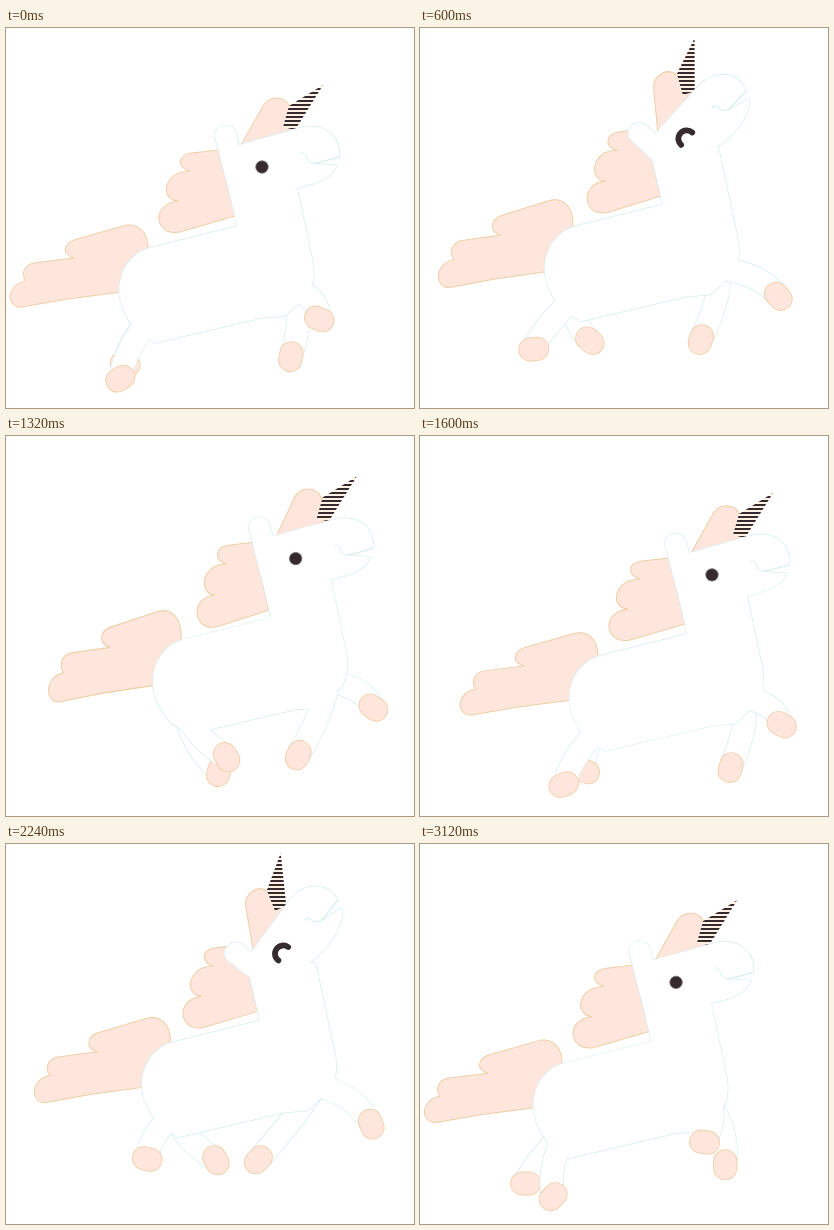
An HTML page with a canvas that plays this animation: 408 px wide and 380 px high, repeating every 3160 ms.

```html
<!DOCTYPE html>
<html>
<head>
<meta charset="utf-8">
<title>Galloping unicorn</title>
<style>
html, body { margin: 0; width: 100%; height: 100%; overflow: hidden; background: #fff; }
canvas { display: block; }
</style>
</head>
<body>
<canvas id="stage" width="408" height="380"></canvas>
<script>
const ctx = document.getElementById('stage').getContext('2d');
const { sin, cos, floor, PI } = Math;
const LOOP = 3160, HOP = LOOP / 2, STEP = 40, TURN = 2 * PI, RAD = PI / 180;
const PEACH = '#ffe6dc', GOLD = '#edcfa6', ICE = '#d6ecef', DARK = '#352b2f';

// All shapes share the coordinates of the resting pose.
const body = new Path2D('M231 198L143 220C118 228 108 255 116 278Q121 292 131 303L149 315L255 290L279 288L301 268Q310 255 307 235L287 141L250 138L221 154L229 188Z');
const head = new Path2D('M211 116L209 109C208 95 227 94 230 105L233 117L297 99C322 95 336 112 333 129L306 136L331 137Q326 153 291 160L240 165L221 155Z');
const mouth = new Path2D('M295 126C296 122 300 126 301 131Q304 136 310 135L333 129');
const tuft = new Path2D('M235 117L257 78C264 66 281 68 284 80L290 102Z');
const horn = new Path2D('M317 57L283 78L277 99L289 102Z');
const mane = new Path2D('M213 122L186 125C172 126 170 140 184 143C163 143 156 161 163 169Q166 173 172 173C157 175 152 184 153 192C155 203 165 206 174 204L229 188Z');
const tail = new Path2D('M142 222C143 202 130 194 117 198L68 212C57 216 56 227 68 230L28 235C17 237 15 247 20 253C7 255 2 266 5 273Q8 280 16 279L62 271L116 264Z');

function ramp(t, from, to) {
  const k = Math.min(1, Math.max(0, (t - from) / (to - from)));
  return k * k * (3 - 2 * k);
}

// Hooves circle a slanted ellipse three times per hop.
const rear = { hip: [145, 290], knee: [-12, 3], center: [150, 344], rx: 48, ry: 10, slant: 0, tilt: 80 };
const fore = { hip: [288, 262], knee: [12, -9], center: [287, 313], rx: 62, ry: 15, slant: 20, tilt: 55 };
const nearLegs = [{ ...rear, phase: 138, swing: 0 }, { ...fore, phase: -65, swing: 0 }];
const farLegs = [{ ...rear, phase: 230, swing: 0 }, { ...fore, phase: 92, swing: -52 }];

function poseLeg({ hip, knee, center, rx, ry, slant, tilt, phase, swing }, hop) {
  const angle = (phase + 1080 * hop + swing * sin(TURN * hop)) * RAD;
  const x = center[0] + rx * cos(angle);
  const y = center[1] + ry * sin(angle) - slant * cos(angle);
  const limb = new Path2D(), hoof = new Path2D();
  limb.moveTo(...hip);
  limb.quadraticCurveTo((hip[0] + x) / 2 + knee[0], (hip[1] + y) / 2 + knee[1], x, y);
  const lean = tilt * RAD + angle / 2, dx = 3.5 * cos(lean), dy = 3.5 * sin(lean);
  hoof.moveTo(x - dx, y - dy);
  hoof.lineTo(x + dx, y + dy);
  return { limb, hoof };
}

function line(path, color, width) {
  ctx.strokeStyle = color;
  ctx.lineWidth = width;
  ctx.stroke(path);
}

function fill(path, color) {
  ctx.fillStyle = color;
  ctx.fill(path);
}

function hair(path) {
  fill(path, PEACH);
  line(path, GOLD, 1);
}

function drawHoof({ hoof }) {
  line(hoof, GOLD, 24);
  line(hoof, PEACH, 22.4);
}

// Draws around a fixed point with a rotation and a stretch.
function around(x, y, { turn = 0, sx = 1, sy = 1 }, paint) {
  ctx.save();
  ctx.translate(x, y);
  ctx.rotate(turn * RAD);
  ctx.scale(sx, sy);
  ctx.translate(-x, -y);
  paint();
  ctx.restore();
}

// The stripes stay level however the horn is turned.
function drawHorn() {
  ctx.save();
  fill(horn, '#fff1e4');
  ctx.clip(horn);
  ctx.resetTransform();
  ctx.fillStyle = DARK;
  for (let y = 0; y < 120; y += 4) ctx.fillRect(0, y, 408, 2);
  ctx.restore();
}

function drawEye(closed) {
  const eye = new Path2D();
  if (closed) {
    eye.arc(257, 138, 8.3, 164 * RAD, 344 * RAD);
    line(eye, DARK, 5.8);
  } else {
    eye.arc(256, 139, 6.2, 0, TURN);
    fill(eye, DARK);
    line(eye, '#6f686c', .8);
  }
}

function draw(t) {
  const s = t % HOP, hop = s / HOP;
  const x = 18 * (1 - cos(TURN * t / LOOP));
  const y = -21.5 * (ramp(s, 0, 480) - ramp(s, 1200, HOP));
  const lift = 38 * (ramp(s, 480, 640) - ramp(s, 970, 1120));
  const sway = sin(TURN * hop) ** 2;
  const near = nearLegs.map(leg => poseLeg(leg, hop));
  const far = farLegs.map(leg => poseLeg(leg, hop));
  const inHead = paint => around(246, 138, { turn: -lift }, paint);

  ctx.resetTransform();
  ctx.fillStyle = '#fff';
  ctx.fillRect(0, 0, 408, 380);
  ctx.translate(x, y);
  ctx.lineCap = ctx.lineJoin = 'round';

  around(130, 250, { sx: 1 - .05 * sway, sy: 1 + .15 * sway }, () => hair(tail));
  around(229, 100, { sx: 1 - .08 * sway, sy: 1 + .04 * sway }, () => hair(mane));
  inHead(() => {
    around(262, 110, { turn: -6 * sway }, () => hair(tuft));
    drawHorn();
  });

  for (const leg of far) {
    line(leg.limb, ICE, 24);
    line(leg.limb, '#fff', 22.6);
    drawHoof(leg);
  }

  // Outlines first, then white on top, so that joints stay seamless.
  near.forEach(leg => line(leg.limb, ICE, 24));
  line(body, ICE, 1.4);
  inHead(() => line(head, ICE, 1.4));
  near.forEach(leg => line(leg.limb, '#fff', 22.6));
  fill(body, '#fff');
  inHead(() => {
    fill(head, '#fff');
    line(mouth, ICE, .9);
    drawEye(lift > 15);
  });
  near.forEach(drawHoof);
}

const start = performance.now();
function tick() {
  const t = (performance.now() - start) % LOOP;
  draw(floor(t / STEP) * STEP);
  requestAnimationFrame(tick);
}
tick();
</script>
</body>
</html>
```
